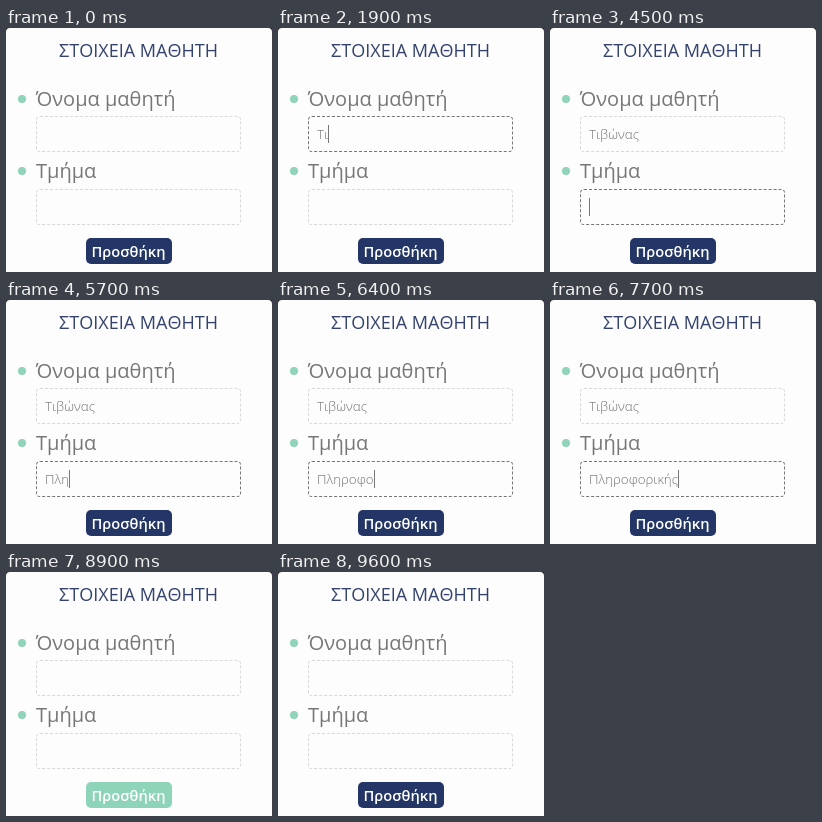
An HTML page with a canvas that plays this animation: 266x244 px, repeating every 9.9 s.

```html
<!DOCTYPE html>
<html lang="el">
<head>
<meta charset="utf-8">
<title>Στοιχεία μαθητή</title>
<style>
  html, body { margin: 0; width: 100%; height: 100%; overflow: hidden; background: #fdfdfd; }
  canvas { position: absolute; left: 0; top: 0; display: block; }
  .field {
    position: absolute; left: 30px; width: 205px; height: 36px;
    box-sizing: border-box; border: 1px dashed #d8d8d8; border-radius: 4px;
  }
  .focus { border-color: #767676; }
  #name { top: 88px; }
  #group { top: 161px; }
</style>
</head>
<body>
<canvas id="stage" width="266" height="244"></canvas>
<div class="field" id="name"></div>
<div class="field" id="group"></div>
<script>
const LOOP = 9900, STEP = 100, BLINK = 530, CLEAR = 8800;
const FONT = '"Open Sans", "Noto Sans", sans-serif';
const NAVY = [36, 54, 101], MINT = [142, 212, 185];
const ctx = document.getElementById('stage').getContext('2d');
ctx.fontKerning = 'none';

const fields = [
  { id: 'name', top: 88, text: 'Τιβώνας', focus: 1000, blur: 4400,
    first: 1700, last: 3300, ease: u => smooth(u ** .85) },
  { id: 'group', top: 161, text: 'Πληροφορικής', focus: 4500, blur: 8700,
    first: 5500, last: 7700, ease: u => u ** 1.4 }
];

const smooth = u => u * u * (3 - 2 * u);
const ramp = (t, from, to) => Math.min(1, Math.max(0, (t - from) / (to - from)));
const mix = (a, b, k) => `rgb(${a.map((v, i) => Math.round(v + (b[i] - v) * k))})`;

// Time at which character i is typed.
function keyTime({ text, first, last, ease }, i) {
  const time = first + (last - first) * ease(i / (text.length - 1));
  return Math.round(time / STEP) * STEP;
}

function label(text, x, y, size, color, weight = 400, align = 'left') {
  ctx.font = `${weight} ${size}px ${FONT}`;
  ctx.textAlign = align;
  ctx.fillStyle = color;
  ctx.fillText(text, x, y);
}

function box(x, y, w, h, r, color) {
  ctx.fillStyle = color;
  ctx.beginPath();
  ctx.roundRect(x, y, w, h, r);
  ctx.fill();
}

function row(text, y) {
  ctx.fillStyle = '#8fd3b8';
  ctx.beginPath();
  ctx.arc(16, y, 4, 0, Math.PI * 2);
  ctx.fill();
  label(text, 30, y + 7, 20, '#777');
}

function drawField(field, t) {
  const { id, top, text, focus, blur } = field;
  const active = t >= focus && t < blur;
  document.getElementById(id).classList.toggle('focus', active);

  let count = 0, lastKey = focus;
  while (count < text.length && keyTime(field, count) <= t) lastKey = keyTime(field, count++);

  const typed = t < CLEAR ? text.slice(0, count) : '';
  label(typed, 39, top + 23, 13.333, '#707070', 300);
  // The caret restarts its blink at every key.
  if (active && (t - lastKey) % (2 * BLINK) < BLINK) {
    ctx.fillStyle = '#777';
    ctx.fillRect(Math.round(39 + ctx.measureText(typed).width), top + 9, 1, 18);
  }
}

function draw(t) {
  box(0, 0, 266, 10, 0, '#222');
  box(0, 0, 266, 244, [4, 4, 0, 0], '#fdfdfd');

  label('ΣΤΟΙΧΕΙΑ ΜΑΘΗΤΗ', 132.5, 29, 18, '#34426f', 400, 'center');
  row('Όνομα μαθητή', 71);
  row('Τμήμα', 143);
  fields.forEach(f => drawField(f, t));

  const hover = ramp(t, 8300, 8500) - ramp(t, 9300, 9600);
  box(80, 210, 86, 26, 5, mix(NAVY, MINT, hover));
  label('Προσθήκη', 122.5, 229, 14.7, '#fff', 600, 'center');
}

function tick() {
  const t = performance.now() % LOOP;
  draw(Math.floor(t / STEP) * STEP);
  requestAnimationFrame(tick);
}
tick();
</script>
</body>
</html>
```
